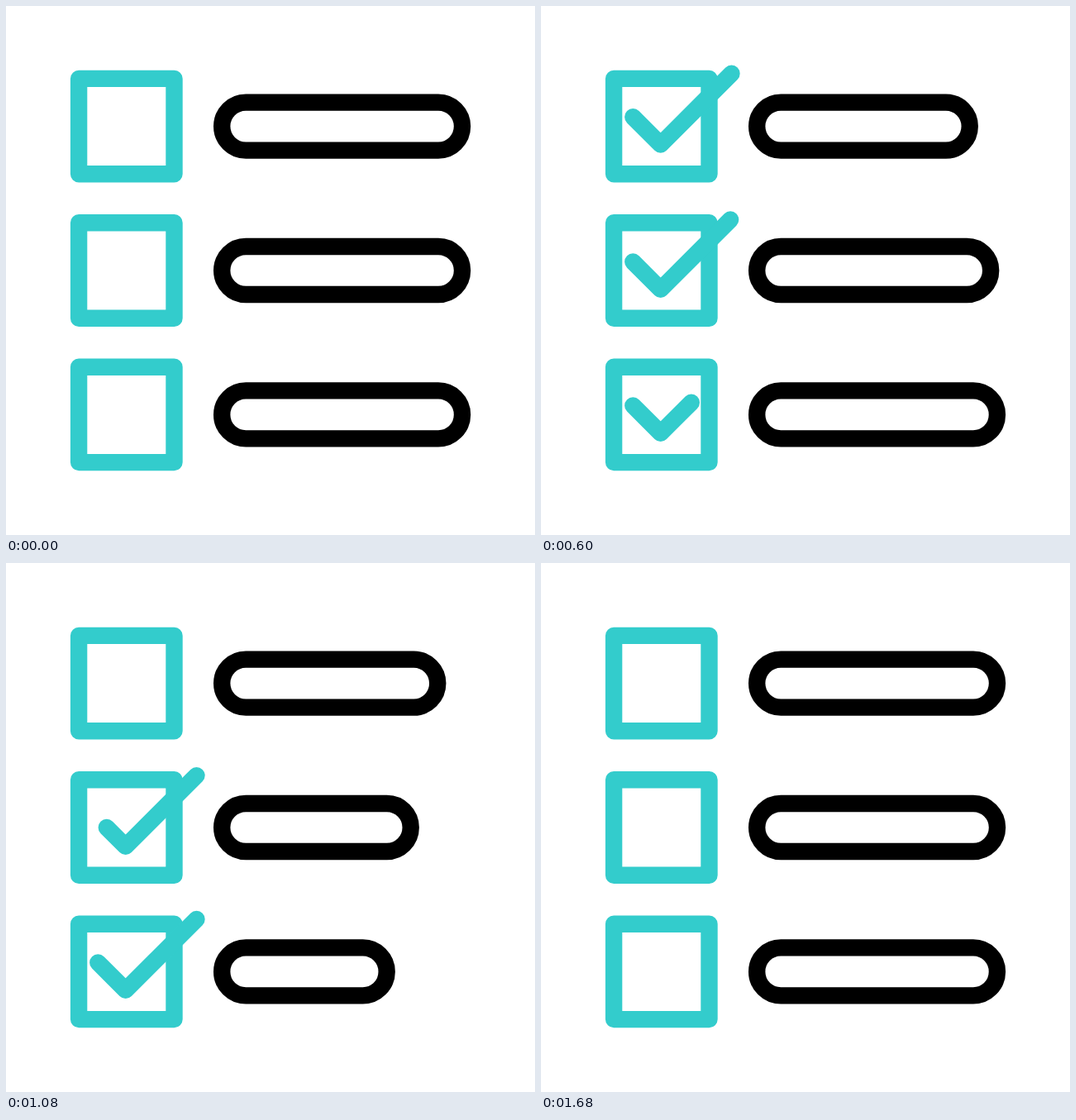
Write an HTML page that moves like this. It is 640 by 640 pixels and loops after 2 s.

```html
<!DOCTYPE html>
<html lang="en">
<head>
<meta charset="utf-8">
<title>Checklist</title>
<style>
  html, body { margin: 0; height: 100%; overflow: hidden; background: #fff; }
  svg { display: block; width: 100%; height: 100%; }
</style>
</head>
<body>
<svg viewBox="0 0 640 640" fill="none" stroke-width="20.4" stroke-linecap="round" stroke-linejoin="round"></svg>
<script>
const LOOP = 2000, STEP = 40, ROW_DELAY = 160;
const TEAL = '#33cccc', BAR_WIDTH = 290.8;
const svg = document.querySelector('svg');

const add = (tag, attrs) => {
  const el = document.createElementNS('http://www.w3.org/2000/svg', tag);
  for (const key in attrs) el.setAttribute(key, attrs[key]);
  return svg.appendChild(el);
};

// y: row centre, shrink: how far the bar shortens, dy: offset of the tick
const rows = [
  { y: 145.6, shrink: 50, dy: 0 },
  { y: 320, shrink: 64.2, dy: 0.9 },
  { y: 494.4, shrink: 93.8, dy: 0.4 },
].map(({ y, shrink, dy }) => ({
  shrink,
  box: add('rect', { x: 88.1, y: y - 57.7, width: 115.4, height: 115.4, stroke: TEAL }),
  tick: add('path', {
    d: `M111.3 ${y + dy - 11.4}l33.4 33.4 85.8-85.8`,
    pathLength: 1, stroke: TEAL,
  }),
  bar: add('rect', { x: 261.2, y: y - 29, height: 58, rx: 29, stroke: '#000' }),
}));

const progress = (t, start, duration) => Math.min(1, Math.max(0, (t - start) / duration));
const easeIn = x => x ** 3;
const easeOut = x => 1 - (1 - x) ** 3;
const easeInOut = x => x < 0.5 ? 4 * x ** 3 : 1 - 4 * (1 - x) ** 3;

function render(time) {
  rows.forEach(({ tick, bar, shrink }, i) => {
    const t = time - i * ROW_DELAY;

    const from = easeIn(progress(t, 800, 270));
    const to = easeOut(progress(t, 200, 310));
    tick.setAttribute('visibility', to > from ? 'visible' : 'hidden');
    tick.setAttribute('stroke-dasharray', `${to - from} 2`);
    tick.setAttribute('stroke-dashoffset', -from);

    const squeeze = Math.min(
      easeInOut(progress(t, 240, 640)),
      1 - easeInOut(progress(t, 805, 590)));
    bar.setAttribute('width', BAR_WIDTH - shrink * squeeze);
  });
}

function loop() {
  const time = performance.now() % LOOP;
  render(Math.floor(time / STEP) * STEP);
  requestAnimationFrame(loop);
}
loop();
</script>
</body>
</html>
```
